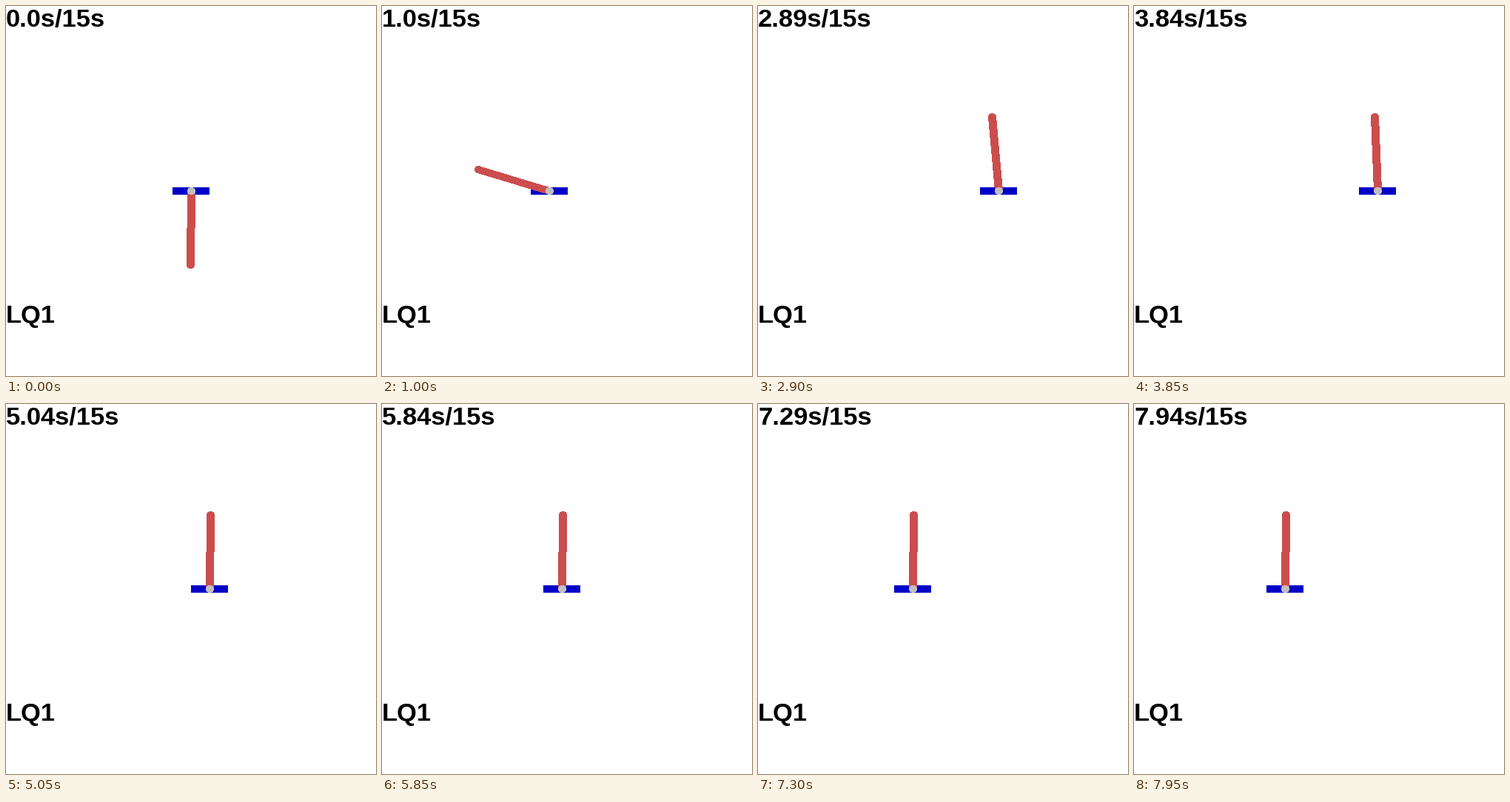
Animation of 500 by 500 pixels, one loop 8000 ms. Source, as a matplotlib script:

```python
import math

import matplotlib.pyplot as plt
import numpy as np
from matplotlib.animation import FuncAnimation
from matplotlib.patches import Ellipse, Polygon, Rectangle

SIZE = 500
FRAMES, STEP = 160, 50
RAIL_Y, ROD = 250, 100
BLUE, RED, GREY = "#0000c8", "#cc4d4d", "#c0c0c0"

# turning points of the cart: (seconds, centre in px)
CART = [(0, 250), (0.4, 210), (0.75, 240), (1, 226.5), (1.35, 260),
        (1.7, 251), (2, 267.5), (2.55, 314.5), (3.4, 332.4),
        (3.85, 329.5), (5.05, 275.3), (6.65, 219.6), (7.95, 204.5)]

# swing-up and balance of the rod: (seconds, degrees from hanging down)
ANGLE = [(0, -0.3), (0.4, 19), (1, -106.8), (1.7, 130), (2, 166),
         (2.7, 185), (3.85, 182.4), (5.05, 179.3), (6.65, 179),
         (7.95, 179.5)]


def eased_path(keys):
    """Cubic curve through the keys that rests at each turning point."""
    t, v = np.array(keys, float).T
    d = np.diff(v) / np.diff(t)
    slope = np.zeros_like(v)
    for k, (a, b) in enumerate(zip(d, d[1:]), 1):
        if a * b > 0:
            slope[k] = 2 * a * b / (a + b)

    def at(now):
        i = min(np.searchsorted(t, now, side="right") - 1, len(t) - 2)
        h = t[i + 1] - t[i]
        u = min((now - t[i]) / h, 1)
        return (v[i] + u * u * (3 - 2 * u) * (v[i + 1] - v[i])
                + u * (1 - u) ** 2 * h * slope[i]
                + u * u * (u - 1) * h * slope[i + 1])

    return at


def clock_labels():
    """Running sum of the time step, cut to hundredths."""
    labels, t = [], 0.0
    for _ in range(FRAMES):
        labels.append(f"{math.floor(t * 100) / 100}s/15s")
        t += STEP / 1000
    return labels


def thick_line(x0, y0, x1, y1):
    """Corners of a line whose thickness runs along its minor axis."""
    if abs(x1 - x0) < abs(y1 - y0):
        return [(x0 - 4.5, y0), (x0 + 5.5, y0),
                (x1 + 5.5, y1), (x1 - 4.5, y1)]
    return [(x0, y0 - 4.5), (x0, y0 + 4.5), (x1, y1 + 4.5), (x1, y1 - 4.5)]


cart_at, angle_at = eased_path(CART), eased_path(ANGLE)
labels = clock_labels()

fig = plt.figure(figsize=(5, 5), dpi=100, facecolor="white")
ax = fig.add_axes([0, 0, 1, 1])
ax.set_xlim(0, SIZE)
ax.set_ylim(SIZE, 0)
ax.axis("off")


def flat(patch, color, snap=False):
    patch.set(facecolor=color, edgecolor="none", linewidth=0, snap=snap,
              antialiased=False, zorder=len(ax.patches))
    return ax.add_patch(patch)


def write(y, text):
    return ax.text(0, y, text, family="Liberation Sans", weight="bold",
                   size=34.5 * 0.72, color="black", va="baseline", ha="left")


# Unsmoothed fills cover every pixel they touch, so shapes are drawn 1 px slim.
cart = flat(Rectangle((225, RAIL_Y - 5), 50, 10), BLUE, snap=True)
rod = flat(Polygon(thick_line(250, 250, 249, 350)), RED)
tip = flat(Ellipse((0, 0), 10, 9), RED)
joint = flat(Ellipse((0, 0), 10, 9), GREY)
clock = write(28, labels[0])
write(428, "LQ1")


def draw(i):
    now = i * STEP / 1000
    x, a = cart_at(now), math.radians(angle_at(now))
    cx = int(x)
    tx = int(x + ROD * math.sin(a))
    ty = round(RAIL_Y + ROD * math.cos(a))
    cart.set_x(cx - 25)
    rod.set_xy(thick_line(cx, RAIL_Y, tx, ty))
    tip.set_center((tx + 0.5, ty))
    joint.set_center((cx + 0.5, RAIL_Y))
    clock.set_text(labels[i])
    return cart, rod, tip, joint, clock


anim = FuncAnimation(fig, draw, frames=FRAMES, interval=STEP,
                     repeat=True, repeat_delay=0)
plt.show()
```
